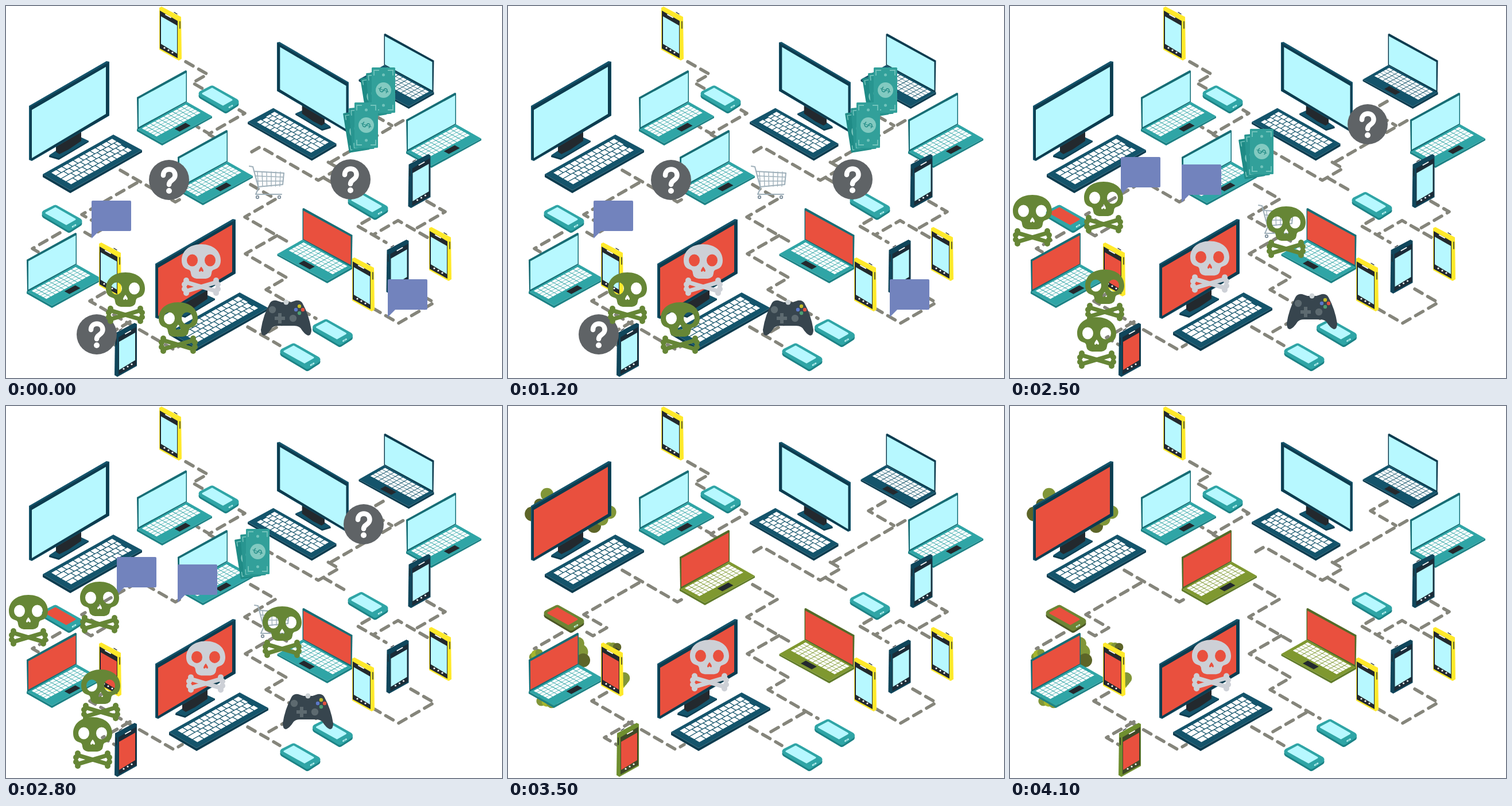
An HTML page for the animation above (4500 ms loop, 864 by 648 pixels).

```html
<!DOCTYPE html>
<html lang="en">
<head>
<meta charset="utf-8">
<title>Network outbreak</title>
<style>
  html, body { margin: 0; width: 100%; height: 100%; overflow: hidden; background: #fff; }
  svg { display: block; width: 100%; height: 100%; }
</style>
</head>
<body>
<svg id="stage" viewBox="0 0 864 648"></svg>
<script>
const LIGHT = '#b7f8ff', RED = '#e9503e', NAVY = '#14546b', DEEP = '#0d3c4f', BLACK = '#23292e';
const ISO = .577; // slope of every isometric edge

const poly = (points, fill, extra = '') => `<polygon points="${points}" fill="${fill}" ${extra}/>`;
const path = (d, fill, extra = '') => `<path d="${d}" fill="${fill}" ${extra}/>`;
const line = (d, color, width, extra = '') =>
  path(d, 'none', `stroke="${color}" stroke-width="${width}" stroke-linecap="round" stroke-linejoin="round" ${extra}`);
const soft = (points, color, width) =>
  poly(points, color, `stroke="${color}" stroke-width="${width}" stroke-linejoin="round"`);
const dot = (x, y, r, fill) => `<circle cx="${x}" cy="${y}" r="${r}" fill="${fill}"/>`;
const group = (transform, body) => `<g transform="${transform}">${body}</g>`;
const shift = (x, y) => `translate(${x} ${y})`;
const mirror = (x, y) => `translate(${x} ${y}) scale(-1 1)`;
const at = (x, y, body) => group(shift(x, y), body);
const range = n => [...Array(n).keys()];

let seed = 7;
const random = () => (seed = seed * 16807 % 2147483647) / 2147483647;

// Key grid inside a unit square that the caller skews into place.
function keys(x, y, w, h, cols, rows, stagger, gap) {
  const cw = w / cols, ch = h / rows;
  let d = '';
  for (const r of range(rows)) {
    const offset = r * stagger % 1;
    for (const c of range(cols)) {
      const left = c ? c + offset : 0;
      const right = c === cols - 1 ? cols : c + 1 + offset;
      const width = right - left - gap;
      if (width > .2) d += `M${x + left * cw} ${y + r * ch}h${width * cw}v${ch * (1 - gap)}h${-width * cw}z`;
    }
  }
  return path(d, '#fff');
}

function monitor(screen) {
  return poly('75,261 90,251 131,229 144,235 144,237 92,268 75,263', DEEP) +
    poly('75,260 90,250 131,229 144,235 92,265', NAVY) +
    poly('87,243 131,217 131,235 109,250 93,258 87,254', BLACK) +
    poly('40,174 175,96 180,97 180,191 45,270 40,268', NAVY) +
    poly('42,176 179,98 179,191 45,269 42,266', DEEP) +
    poly('45,181 174,106 174,188 45,265', screen) +
    poly('64,293 112,321 237,251 237,255 112,326 64,298', DEEP) +
    poly('64,293 187,224 237,251 112,321', NAVY) +
    group('matrix(123 -69 48 28 64 293)', keys(.08, .11, .87, .74, 11, 4, .4, .14));
}

function laptop(screen, [top, side, frame]) {
  const pad = `<rect x=".39" y=".72" width=".22" height=".2" fill="${BLACK}"/>`;
  return poly('228,214 272,239 359,192 359,195 272,243 228,218', side) +
    poly('228,214 315,167 359,192 272,239', top) +
    group('matrix(87 -47 44 24 228 215)', keys(.07, .06, .89, .6, 10, 5, 0, .13) + pad) +
    poly('228,159 313,112 315,113 315,167 229,215', frame) +
    poly('231,161.5 313.5,116.5 313.5,166 231,211', screen);
}

function phone(screen, [body, face]) {
  const buttons = range(3).map(i => dot(276 + 7 * i, 73 + 4 * i, 1.6, '#fff')).join('');
  return poly('267,3 271,1 305,19 306,92 301,95 267,76', body) +
    poly('268,8 299,26 299,91 268,74', face) +
    poly('270,18 298,34 298,83 270,66', screen) +
    line('M278 15l9 5', '#fff', 2) + line('M293 11l5 3M303 27v12', BLACK, 1.4) + buttons;
}

function handset(screen, [top, side]) {
  const shell = '341,153 359,144 400,167 383,178';
  return at(0, 3.5, soft(shell, side, 11)) + soft(shell, top, 11) +
    soft('343,152.5 359,144 393,163.5 378,172', screen, 3) +
    line('M389 176.5l5 -3', '#d9ffff', 2.5) + line('M390 176l3 -2', top, 1);
}

const TEAL = ['#2fa5a6', '#1c8285', '#176d75'];
const INKY = [NAVY, DEEP, DEEP];
const MOSS = ['#7f9830', '#617c2a', '#526b29'];
const YELLOW = ['#ffe92b', BLACK];
const STEEL = ['#10465b', '#1b2c38'];
const SICK_PHONE = ['#6f8f30', '#3e4a28'];
const SICK_HANDSET = ['#6c8534', '#4a5626'];

// name, drawing, placement, healthy colours, infected colours
const DEVICES = [
  ['monitorLeft', monitor, shift(0, 0)],
  ['monitorMid', monitor, shift(220, 275)],
  ['monitorRight', monitor, 'translate(632.7 -23.9) scale(-.893 .9)'],
  ['laptopTop', laptop, shift(0, 0), TEAL],
  ['laptopMid', laptop, shift(71, 104), TEAL, MOSS],
  ['laptopLeft', laptop, shift(-192, 283), TEAL],
  ['laptopDark', laptop, mirror(973.5, -64), INKY],
  ['laptopRight', laptop, shift(469, 39), TEAL],
  ['laptopLow', laptop, mirror(831.5, 240), TEAL, MOSS],
  ['handsetTop', handset, shift(0, 0), TEAL],
  ['handsetRight', handset, shift(260, 185.5), TEAL],
  ['handsetLeft', handset, shift(-273, 208), TEAL, SICK_HANDSET],
  ['handsetLow', handset, shift(198.5, 407), TEAL],
  ['handsetBottom', handset, shift(142, 449), TEAL],
  ['phoneTop', phone, shift(0, 0), YELLOW],
  ['phoneLeft', phone, shift(-105, 411), YELLOW],
  ['phoneMid', phone, shift(336, 437), YELLOW],
  ['phoneRight', phone, shift(470, 384), YELLOW],
  ['phoneDark', phone, mirror(1006.5, 257), STEEL],
  ['phoneDarkLow', phone, mirror(968.5, 406), STEEL],
  ['phoneDarkLeft', phone, mirror(495, 551), STEEL, SICK_PHONE],
];

// A cable zigzags on the isometric grid: its slope flips after every run.
function cable(x, y, slope, ...runs) {
  const d = `M${x} ${y}` + runs.map((run, i) => `l${run} ${run * slope * ISO * (i % 2 ? -1 : 1)}`).join('');
  return line(d, '#85857b', 5.5, 'stroke-dasharray="15 11"');
}
const CABLES = [
  cable(313, 97, 1, 38, -26, 19), cable(406, 181, 1, 10, -62, -21), cable(354, 224, 1, 8),
  cable(428, 254, -1, 15, 101, 36, -27), cable(553, 299, 1, 44), cable(566, 272, -1, 130),
  cable(657, 166, -1, -29, 44), cable(199, 286, 1, 96, 13), cable(228, 308, -1, -96, 40, -24, -18),
  cable(94, 395, -1, -48, 14), cable(426, 311, 1, 44, -54, 76), cable(472, 400, -1, -55, 72, -36, 87),
  cable(516, 534, -1, -64), cable(421, 559, 1, 56), cable(733, 340, 1, 32, -53),
  cable(734, 403, 1, -51, -41), cable(633, 371, -1, -21, 50), cable(705, 493, 1, 41, -62, -42),
  cable(172, 499, -1, -26, 146, 15), cable(216, 550, -1, -48, 22),
].join('');

// Mould grows in random clumps between two points.
function mould(x1, y1, x2, y2, size) {
  return range(3).map(i => {
    const t = i / 2;
    const color = ['#5d6528', '#a6b52d', '#819638'][Math.floor(random() * 3)];
    return dot(x1 + (x2 - x1) * t, y1 + (y2 - y1) * t, size * (.8 + random() * .4), color);
  }).join('');
}
const MOULD = mould(42, 188, 68, 154, 11) + mould(150, 209, 177, 185, 11) + mould(44, 437, 54, 430, 8) +
  mould(121, 414, 131, 443, 12) + mould(58, 514, 76, 517, 8) + mould(176, 419, 190, 420, 8) +
  mould(197, 484, 202, 474, 9);

function skull(color) {
  const oval = (x, y, rx, ry) => `M${x - rx} ${y}a${rx} ${ry} 0 1 0 ${2 * rx} 0a${rx} ${ry} 0 1 0 ${-2 * rx} 0`;
  const head = 'M34 0C13 0 0 12 0 28C0 37 4 42 11 44Q16 45 16 51Q17 59 26 60H42Q51 59 52 51Q52 45 57 44C64 42 68 37 68 28C68 12 55 0 34 0Z';
  const nose = 'M34 39C30 44 28.500 48 32 48L34 46L36 48C39.500 48 38 44 34 39Z';
  const knobs = [[5, 70], [8, 63], [63, 78], [60, 85]].map(([x, y]) => dot(x, y, 5, color)).join('');
  const bone = line('M7 66L61 82', color, 7.5) + knobs;
  return path(head + oval(18.5, 28, 9.5, 10.5) + oval(49.5, 28, 9.5, 10.5) + nose, color, 'fill-rule="evenodd"') +
    bone + group(mirror(68, 0), bone);
}

function bill(color) {
  const trim = '#72c3bb';
  return `<rect width="41" height="79" rx="1.5" fill="${color}"/>` +
    path('M4 14V5H13M28 5H37V14M4 65V74H13M28 74H37V65', 'none', `stroke="${trim}" stroke-width="1.8"`) +
    dot(20.5, 39.5, 13.5, '#83cac1') + dot(20.5, 13, 2.5, trim) + dot(20.5, 66, 2.5, trim) +
    group('translate(20.5 39.5) rotate(105)',
      '<text y="7" text-anchor="middle" font-family="Lato, sans-serif" font-size="20" fill="#2b918b">$</text>');
}

function gamepad() {
  const knob = '#5d6a70';
  const buttons = ['#e2503f', '#4e9d72', '#5b78c8', '#c5bd27'].map((color, i) =>
    dot(67 + 6 * Math.cos(i * Math.PI / 2), 17 + 6 * Math.sin(i * Math.PI / 2), 3.2, color)).join('');
  return path('M16 5Q20 0 27 1L36 4H52L61 1Q68 0 72 5Q84 26 88 52Q88 62 82 62Q76 60 69 49Q65 45 58 45H30Q23 45 19 49Q12 60 6 62Q0 62 0 52Q4 26 16 5Z', '#37454e') +
    dot(44, 4, 4.5, '#cdd3d6') + dot(20, 17, 6.2, knob) + dot(56, 32, 6.2, knob) +
    path('M33 23V41M24 32H42', 'none', `stroke="${knob}" stroke-width="6"`) + buttons;
}

function cart() {
  const bars = range(6).map(i => `M${15 + 8 * i} 12l${1.5 - i / 2} 25`).join('');
  const wheel = x => dot(x, 56, 3.2, '#8494a0') + dot(x, 56, 1.2, '#fff');
  return line('M1 2L7 3L17 40L12 51H57M9 11L61 14L59 34L16 38', '#9fb0ba', 2.1) +
    line(bars + 'M11 19L60 21M13 28L60 28', '#9fb0ba', 1.4) + wheel(15) + wheel(53);
}

const ICONS = {
  money: group('translate(0 19) rotate(-9) scale(.88)', bill('#1f8b86')) +
    group('translate(10 10) rotate(-5) scale(.94)', bill('#289590')) + at(20, 0, bill('#32a09a')),
  ask: dot(0, 0, 35, '#5f6366') +
    line('M-10 -8C-10 -22 10.500 -22 10.500 -8C10.500 1 0 0 0 8', '#fff', 8.5) + dot(0, 19, 5, '#fff'),
  bubble: path('M2 0H67Q69 0 69 2V51Q69 53 67 53H13L0 66V2Q0 0 2 0Z', '#7283bd'),
  cart: cart(),
  pad: gamepad(),
  ghost: skull('#cdd0d6'),
  skull: skull('#668636'),
};

// The pale skull slides along one slanted line.
const ghost = step => [[306 + step, 415 - .7 * step]];

const SCENES = [
  { until: 2000, red: [], icons: {
    money: [[617, 107], [587, 168]], ask: [[284, 303], [600, 302], [158, 572]],
    bubble: [[149, 339], [665, 476]], cart: [[423, 277]], pad: [[444, 512]],
    ghost: ghost(0), skull: [[174, 464], [266, 516]] } },
  { until: 2500, red: ['laptopLeft'], icons: {
    money: [[413, 198], [521, 193]], ask: [[242, 279], [619, 208], [604, 303]],
    bubble: [[339, 53], [178, 270], [151, 337], [745, 449]], cart: [[417, 297], [436, 350]],
    pad: [[467, 494], [400, 548]], ghost: ghost(5),
    skull: [[1, 336], [120, 422], [174, 470], [252, 505]] } },
  { until: 3000, red: ['laptopLeft', 'handsetLeft', 'phoneLeft', 'phoneDarkLeft'], icons: {
    money: [[398, 214]], ask: [[623, 206]], bubble: [[193, 263], [299, 276]],
    cart: [[432, 345]], pad: [[482, 501]], ghost: ghost(8),
    skull: [[5, 329], [129, 306], [131, 459], [117, 542], [447, 349]] } },
  { until: 3500, drop: 1.5, red: ['laptopLeft', 'laptopMid', 'handsetLeft', 'phoneDarkLeft'], icons: {
    ghost: ghost(3), skull: [[180, 216], [120, 276], [400, 242], [412, 315]] } },
  { until: 4500, sick: true,
    red: ['monitorLeft', 'laptopLeft', 'laptopMid', 'handsetLeft', 'phoneLeft', 'phoneDarkLeft'],
    icons: { ghost: ghost(11) } },
];
const ALWAYS_RED = ['monitorMid', 'laptopLow'];

function drawScene({ red, sick, drop = 0, icons }) {
  const infected = new Set([...ALWAYS_RED, ...red]);
  const devices = DEVICES.map(([name, draw, place, colors, sickColors]) =>
    group(place, draw(infected.has(name) ? RED : LIGHT, sick && sickColors || colors))).join('');
  const overlay = Object.entries(icons).map(([name, spots]) =>
    spots.map(([x, y]) => at(x, y, ICONS[name])).join('')).join('');
  return `<g display="none">${at(0, drop, CABLES + (sick ? MOULD : '') + devices)}${overlay}</g>`;
}

const stage = document.getElementById('stage');
stage.innerHTML = SCENES.map(drawScene).join('');
const layers = [...stage.children];
const start = performance.now();
let shown = -1;

function tick() {
  const time = (performance.now() - start) % SCENES.at(-1).until;
  const index = SCENES.findIndex(scene => time < scene.until);
  if (index !== shown) {
    layers.forEach((layer, i) => layer.setAttribute('display', i === index ? 'inline' : 'none'));
    shown = index;
  }
  requestAnimationFrame(tick);
}
tick();
</script>
</body>
</html>
```
